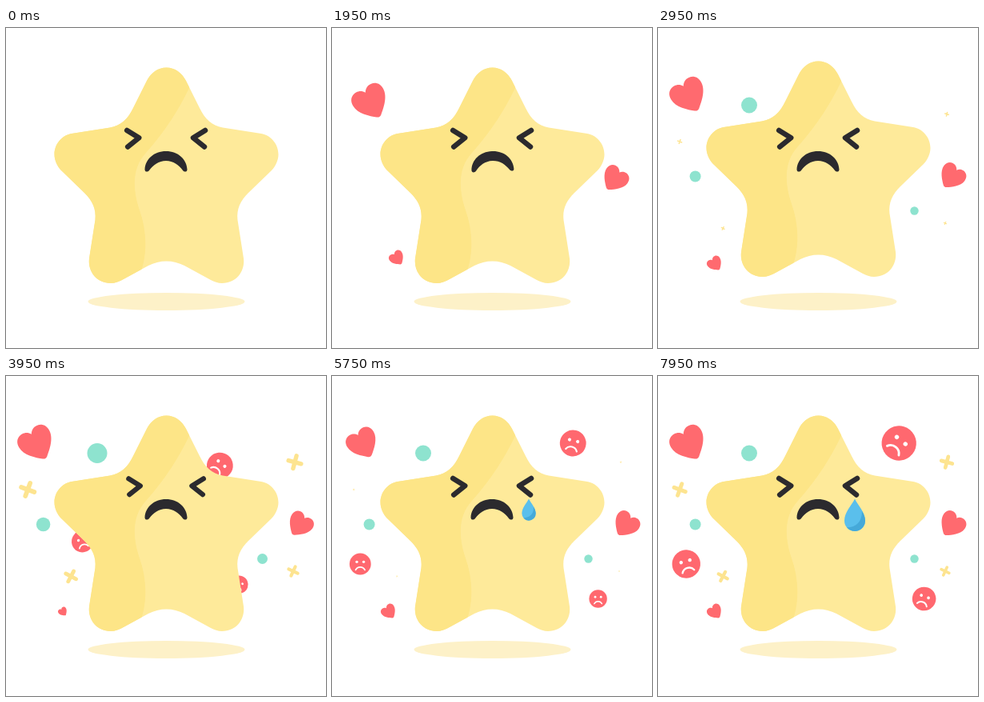
An HTML page that plays this animation: 400 px wide and 400 px high, repeating every 9.95 s.

```html
<!DOCTYPE html>
<html lang="en">
<head>
<meta charset="utf-8">
<title>Sad star</title>
<style>
html, body { margin: 0; height: 100%; overflow: hidden; background: #fff; }
svg { display: block; width: 100%; height: 100%; }
</style>
</head>
<body>
<svg viewBox="0 0 400 400">
  <defs>
    <path id="heart" fill="#ff6a6f" d="M0-.6C.25-1.05 1-.95 1-.3C1 .25 .45 .7 .15 .95Q0 1.07-.15 .95C-.45 .7-1 .25-1-.3C-1-.95-.25-1.05 0-.6Z"/>
    <path id="cross" fill="none" stroke="#fde490" stroke-width=".5" stroke-linecap="round" d="M0-.75V.75M-.75 0H.75"/>
    <circle id="dot" r="1" fill="#8ee3cf"/>
    <g id="frown">
      <circle r="1" fill="#ff686f"/>
      <circle cx="-.32" cy="-.2" r=".125" fill="#fff"/>
      <circle cx=".32" cy="-.2" r=".125" fill="#fff"/>
      <path d="M-.43 .55C-.25 .2 .25 .2 .43 .55" fill="none" stroke="#fff" stroke-width=".13" stroke-linecap="round"/>
    </g>
    <path id="body" d="M200.5 49.5C211 49.5 220 56 225 66L242 100C249 114 257 122 271 124.5L319 132C331 134 340.5 145 340.5 158C340.5 165 337 173 332 178L303 206C293 216 288 226 289.5 240L297 288C299 305 287 319 270 319C265 319 260 317 256 315L223 297C209 289.5 192 289.5 178 297L145 315C141 317 136 319 131 319C114 319 102 305 104 288L111.5 240C113 226 108 216 98 206L69 178C64 173 60.5 165 60.5 158C60.5 145 70 134 82 132L130 124.5C144 122 152 114 159 100L176 66C181 56 190 49.5 200.5 49.5Z"/>
    <clipPath id="clip"><use href="#body"/></clipPath>
  </defs>
  <ellipse cx="200.5" cy="342" rx="98" ry="11" fill="#fdf1c8"/>
  <g id="bits"></g>
  <g id="star">
    <use href="#body" fill="#feea9a"/>
    <path clip-path="url(#clip)" fill="#fde587" d="M0 0H240L229 75C217 100 200 128 175 156C158 174 158 200 166 225C176 252 177 280 169 304L160 330H0Z"/>
  </g>
  <g fill="none" stroke="#2b2a2e" stroke-width="6.5" stroke-linecap="round" stroke-linejoin="round">
    <path id="eyeL" d="M-7.5-10L7.5-.7L-6.5 10.5"/>
    <path id="eyeR" d="M7.5-10L-7.5-.7L6.5 10.5"/>
  </g>
  <path id="mouth" fill="#2b2a2e" d="M173.5 177C174 164 185 154 200 154S226 164 226.500 177C226.500 180 223 180.500 221 178C216 171 209 166 200 166S184 171 179 178C177 180.500 173.500 180 173.500 177Z"/>
  <g id="tear">
    <path fill="#5abfec" d="M0 0C4 8.500 13 16.500 13 27.500A13 13 0 0 1-13 27.500C-13 16.500-4 8.500 0 0Z"/>
    <path fill="#45a9d9" d="M9 15.500C12 20 13 24 13 27.500A13 13 0 0 1-10 35.800C2 35.500 9 29 9 15.500Z"/>
  </g>
</svg>
<script>
const LOOP = 9950, LAST = 7950;
const $ = id => document.getElementById(id);
let clock = 0;

const ramp = (a, b) => Math.min(1, Math.max(0, (clock - a) / (b - a)));
const ease = (a, b) => Math.sin(ramp(a, b) * Math.PI / 2) ** 2;
const bump = (a, b) => Math.sin(ramp(a, b) * Math.PI) ** 2;
const left = (a, b) => (1 - ramp(a, b)) ** 2; // distance still to fly, 1 to 0

function place(el, x, y, scale = 1, turn = 0) {
  el.setAttribute("transform", `translate(${x} ${y}) rotate(${turn}) scale(${scale})`);
}

function add(shape, props) {
  const el = document.createElementNS("http://www.w3.org/2000/svg", "use");
  el.setAttribute("href", "#" + shape);
  $("bits").append(el);
  return { el, ...props };
}

// dx, dy: offset of the launch point behind the star
const hearts = [
  { x: 38.3, y: 84, r: 21.7, turn: -30, dx: 111, dy: 89, pulse: 4470 },
  { x: 367.6, y: 185.4, r: 16, turn: 36, dx: -155, dy: 33, pulse: 3820 },
  { x: 71.2, y: 294.6, r: 9.2, turn: -36, dx: 111, dy: -78, pulse: 3050 }
].map(h => add("heart", h));

const frowns = [
  { x: 301.2, y: 84, r: 16.4, dx: -93, dy: 77, turn: 14, swing: 25 },
  { x: 35.3, y: 235, r: 13.4, dx: 165, dy: -77, turn: 0, swing: -16 },
  { x: 332.6, y: 278.5, r: 11.2, dx: -113, dy: -49, turn: 0, swing: 20 }
].map(f => add("frown", f));

const dots = [
  { x: 114, y: 96.5, r: 10 },
  { x: 46.6, y: 185.5, r: 7 },
  { x: 320.5, y: 228.5, r: 5.2 }
].map(d => add("dot", d));

const crosses = [
  { x: 27.2, y: 142, r: 10, turn: 20 },
  { x: 361, y: 107.7, r: 9.4, turn: 15 },
  { x: 81.2, y: 250.4, r: 8.4, turn: 28 },
  { x: 359, y: 244, r: 7.2, turn: 25 }
].map(c => add("cross", c));

function draw() {
  const heartFly = left(550, 2550);
  for (const h of hearts)
    place(h.el, h.x + h.dx * heartFly, h.y + h.dy * heartFly,
      h.r * (1 - .42 * bump(h.pulse, h.pulse + 1560)), h.turn);

  const frownFly = left(3157, 5157);
  const tilt = 1 - ease(4700, 5700) + ease(6500, 7950);
  const swell = 1 + .32 * ease(6500, 7850);
  for (const f of frowns)
    place(f.el, f.x + f.dx * frownFly, f.y + f.dy * frownFly,
      f.r * swell, f.turn + f.swing * tilt);

  const dotSize = ease(2050, 2850) + .25 * bump(3400, 4500);
  for (const d of dots) place(d.el, d.x, d.y, d.r * dotSize);

  const crossSize = ease(2600, 3500) + .15 * bump(3500, 4400)
    - .88 * (ease(4800, 5700) - ease(6050, 7450));
  for (const c of crosses) place(c.el, c.x, c.y, c.r * crossSize, c.turn);

  place($("star"), 0, -14 * bump(1960, 3320));

  const squint = bump(3400, 5600);
  place($("eyeL"), 158.7 + 3.8 * squint, 138, 1 - .07 * squint);
  place($("eyeR"), 241.5 - 3.8 * squint, 138, 1 - .07 * squint);

  const rock = Math.sin(2 * Math.PI * ramp(600, 2150));
  $("mouth").setAttribute("transform", `translate(${-.7 * rock}) rotate(${3.3 * rock} 200 167)`);
  place($("tear"), 246, 153.5, ease(5050, 6200));
}

function frame(now) {
  const t = now % LOOP;
  // the picture advances in 100 ms steps
  clock = t < 650 ? 0 : Math.min(LAST, 50 + 100 * Math.floor((t - 50) / 100));
  draw();
  requestAnimationFrame(frame);
}
draw();
requestAnimationFrame(frame);
</script>
</body>
</html>
```
